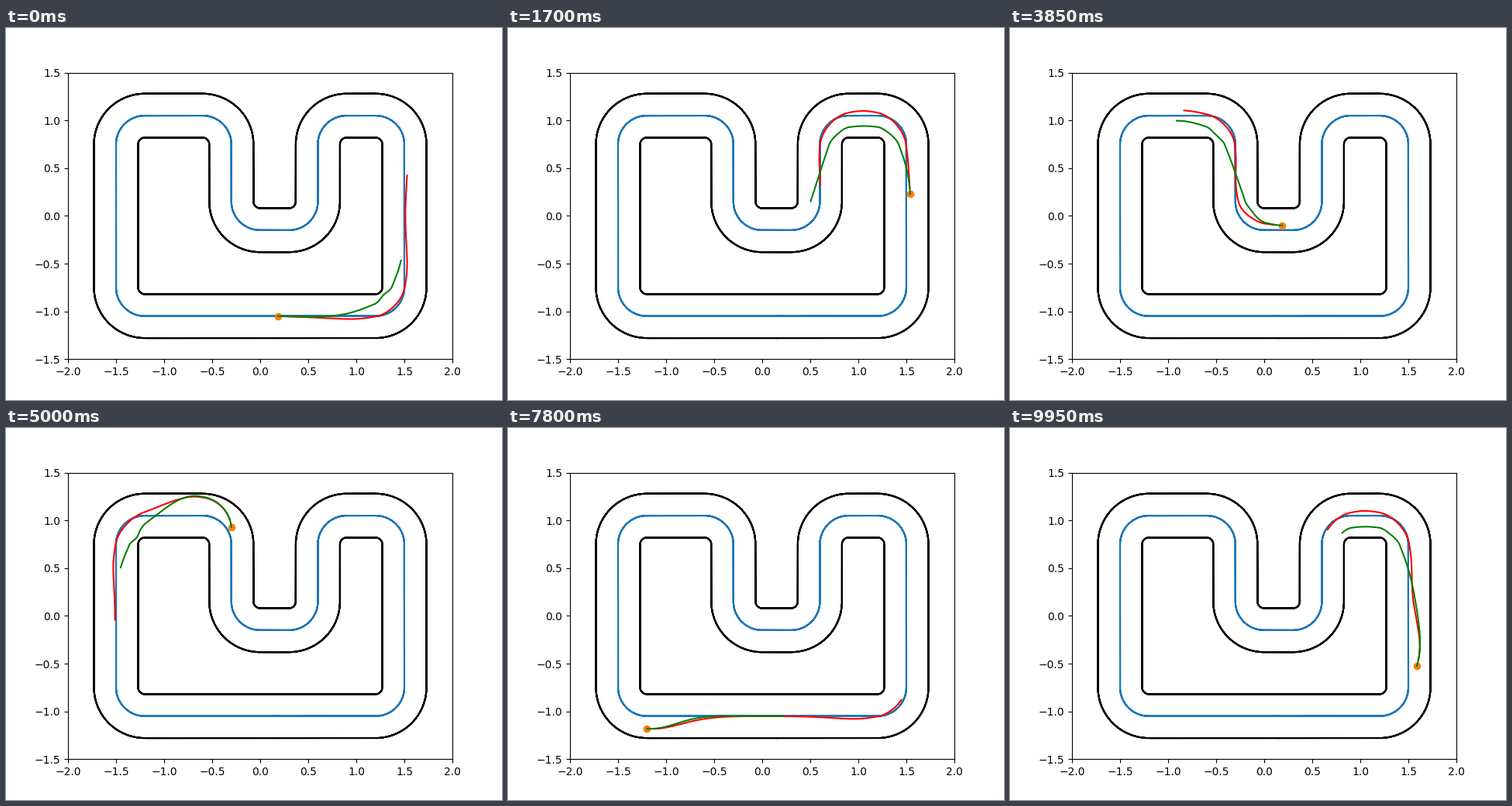
Recreate the animation shown at these times as a matplotlib script. Size 640 by 480 pixels, loop 10000 ms.

```python
import numpy as np
import matplotlib.pyplot as plt
from matplotlib.animation import FuncAnimation

FRAMES, INTERVAL = 200, 50
RADIUS, HALF_WIDTH = 0.3, 0.23

# ---- track: straights joined by quarter turns (+1 left, -1 right) ----
STRAIGHTS = [1.05, 1.5, 0.3, 0.6, 0.3, 0.6, 0.6, 1.5, 1.35]
TURNS = [1, 1, 1, -1, -1, 1, 1, 1]
ARC = RADIUS * np.pi / 2

knots, headings, corners = [0.0], [0.0], []
for i, length in enumerate(STRAIGHTS):
    knots.append(knots[-1] + length)
    headings.append(headings[-1])
    if i < len(TURNS):
        corners.append(knots[-1] + ARC / 2)
        knots.append(knots[-1] + ARC)
        headings.append(headings[-1] + TURNS[i] * np.pi / 2)
LAP = knots[-1]

grid = np.linspace(0, LAP, 12001)
step = grid[1]
mid = np.interp(grid[:-1] + step / 2, knots, headings)
track_x = 0.15 + np.concatenate([[0], np.cumsum(np.cos(mid)) * step])
track_y = -1.05 + np.concatenate([[0], np.cumsum(np.sin(mid)) * step])


def place(s, d):
    """Point at distance s along the track, d to the left of the centre line."""
    s = np.asarray(s) % LAP
    a = np.interp(s, knots, headings)
    x = np.interp(s, grid, track_x) - d * np.sin(a)
    y = np.interp(s, grid, track_y) + d * np.cos(a)
    return x, y


def smooth(x, xs, ys):
    """Cubic Hermite curve through the points."""
    m = np.gradient(ys, xs)
    i = np.clip(np.searchsorted(xs, x) - 1, 0, len(xs) - 2)
    h = xs[i + 1] - xs[i]
    u = (x - xs[i]) / h
    return ((1 + 2 * u) * (1 - u) ** 2 * ys[i] + u * (1 - u) ** 2 * h * m[i]
            + u * u * (3 - 2 * u) * ys[i + 1] + u * u * (u - 1) * h * m[i + 1])


# ---- car: time, distance, offset at a few points of the drive ----
CAR_T, CAR_S, CAR_D = np.array([
    (0, 0.035, 0), (1.05, 1.61, -0.05), (1.7, 2.5, -0.04), (2.1, 3.3, 0.05),
    (3.15, 5.03, -0.03), (3.85, 5.45, -0.05), (5.0, 6.867, -0.05),
    (5.25, 7.078, -0.18), (6.25, 8.35, -0.016), (6.7, 8.9, 0.05),
    (7.8, 10.22, -0.13), (8.1, 10.55, -0.155), (9.45, 12.84, 0.045),
    (9.95, 13.316, -0.089)]).T


def car(t):
    s = smooth(t, CAR_T, CAR_S)
    return s, smooth(s, CAR_S, CAR_D)


# ---- predicted paths ----
def bend(s, width):
    """Signed bump at every corner."""
    total = 0
    for turn, c in zip(TURNS, corners):
        gap = (s - c + LAP / 2) % LAP - LAP / 2
        total = total + turn * np.exp(-(gap / width) ** 2)
    return total


def wave(s, peak):
    return np.cos(2 * np.pi * (s - peak) / LAP)


def plan(t, reach, settle, line, lead=0.0):
    """Follow an ideal line, first swinging back from the car's own course."""
    s0, d0 = car(t)
    u = np.linspace(lead, reach, 160)
    eps = 1e-3
    slope = (d0 - smooth(s0 - eps, CAR_S, CAR_D)) / eps
    error = d0 - line(s0)
    drift = slope - (line(s0 + eps) - line(s0)) / eps
    d = line(s0 + u) + (error + drift * u) * np.exp(-(u / settle) ** 2)
    return place(s0 + u, d)


def red_line(s):
    # wide before and after a corner, tight inside it
    return 0.107 * bend(s, 0.34) - 0.082 * bend(s, 0.6)


def red_plan(t):
    reach = 2.33 + 0.4 * wave(car(t)[0], 10.5)
    return plan(t, reach, 0.5, red_line, lead=0.06)


def green_plan(t):
    # a longer reach means more speed, so corners are cut less
    reach = 1.85 + 0.55 * wave(car(t)[0], 3.2)
    return plan(t, reach, 0.34 * reach, lambda s: 0.33 / reach * bend(s, 0.4))


# ---- picture ----
fig, ax = plt.subplots(figsize=(6.4, 4.8), dpi=100)
laps = np.linspace(0, 3 * LAP, 3001)
for offset, color in ((0, "C0"), (HALF_WIDTH, "k"), (-HALF_WIDTH, "k")):
    ax.plot(*place(laps, offset), color=color)
dot, = ax.plot([], [], "o", color="C1")
red, = ax.plot([], [], color="r")
green, = ax.plot([], [], color="g")
ax.set_xlim(-2, 2)
ax.set_ylim(-1.5, 1.5)


def update(i):
    t = i * INTERVAL / 1000
    x, y = place(*car(t))
    dot.set_data([x], [y])
    red.set_data(*red_plan(t))
    green.set_data(*green_plan(t))
    return dot, red, green


anim = FuncAnimation(fig, update, frames=FRAMES, interval=INTERVAL,
                     repeat=True, repeat_delay=0)
plt.show()
```
